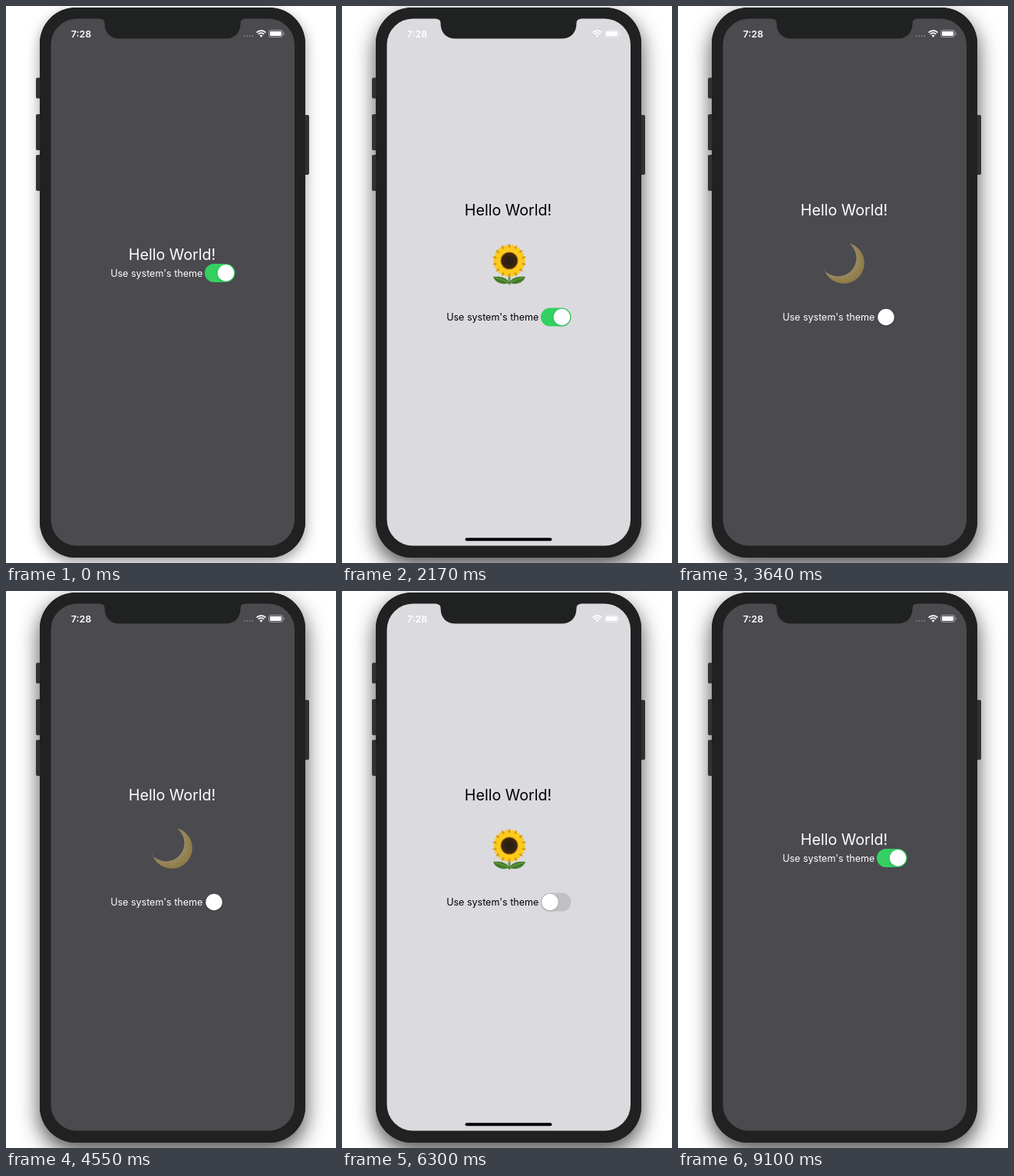
An HTML page with a canvas for the animation above (9310 ms loop, 430x726 px).

```html
<!DOCTYPE html>
<html lang="en">
<head>
<meta charset="utf-8">
<title>Theme switch</title>
<style>
  html, body { margin: 0; width: 100%; height: 100%; overflow: hidden; background: #fff; }
  canvas { display: block; width: 430px; height: 726px; }
</style>
</head>
<body>
<canvas id="stage"></canvas>
<script>
const W = 430, H = 726, LOOP = 9310;
const OFF_AT = 2170, DARK_AT = 3640, LIGHT_AT = 4620, ON_AT = 6370;
const SLIDE = 260, PRESSED = 0.45;
const FONT = 'Inter, Roboto, sans-serif';
const GREEN = [52, 209, 98];
const THEMES = {
  dark: { bg: [75, 74, 79], track: [75, 74, 79], text: '#fff', dots: '#858489' },
  light: { bg: [219, 218, 223], track: [193, 192, 196], text: '#000', dots: '#e3e2e6' }
};

const canvas = document.getElementById('stage');
const ctx = canvas.getContext('2d');
const scale = window.devicePixelRatio || 1;
canvas.width = W * scale;
canvas.height = H * scale;

const clamp = v => Math.max(0, Math.min(1, v));
const progress = (t, start, length) => clamp((t - start) / length);
const ease = p => p * p * (3 - 2 * p);
const rgb = c => `rgb(${c.map(Math.round).join()})`;
const mix = (a, b, p) => a.map((v, i) => v + (b[i] - v) * p);

function box(x, y, w, h, r, fill) {
  ctx.beginPath();
  ctx.roundRect(x, y, w, h, r);
  ctx.fillStyle = fill;
  ctx.fill();
}

function disc(c, x, y, r, fill) {
  c.beginPath();
  c.arc(x, y, r, 0, Math.PI * 2);
  c.fillStyle = fill;
  c.fill();
}

function label(text, x, y, size, fill, weight = 400) {
  ctx.font = `${weight} ${size}px ${FONT}`;
  ctx.textAlign = 'center';
  ctx.fillStyle = fill;
  ctx.fillText(text, x, y);
}

// Emoji are drawn once, so that they can fade as a whole.
const SPRITE = { x: 186, y: 304, size: 64 };
function sprite(draw) {
  const layer = document.createElement('canvas');
  layer.width = layer.height = SPRITE.size * scale;
  const c = layer.getContext('2d');
  c.scale(scale, scale);
  c.translate(-SPRITE.x, -SPRITE.y);
  draw(c);
  return layer;
}

function petals(c, count, turn, inner, outer, half, fill) {
  c.fillStyle = fill;
  for (let i = 0; i < count; i++) {
    c.save();
    c.translate(218, 332);
    c.rotate(turn + i * Math.PI * 2 / count);
    c.beginPath();
    c.moveTo(inner, 0);
    c.quadraticCurveTo(inner + 5, -half * 1.8, outer, 0);
    c.quadraticCurveTo(inner + 5, half * 1.8, inner, 0);
    c.fill();
    c.restore();
  }
}

function leaf(c, side) {
  c.save();
  c.translate(218, 361);
  c.scale(side, 1);
  c.beginPath();
  c.moveTo(0, 0);
  c.bezierCurveTo(3, -7, 11, -9, 21, -8);
  c.bezierCurveTo(18, 0, 9, 3, 0, 0);
  c.fillStyle = '#437c2b';
  c.fill();
  c.beginPath();
  c.moveTo(2, -1);
  c.quadraticCurveTo(9, -5, 18, -7);
  c.strokeStyle = '#78a650';
  c.lineWidth = 1;
  c.stroke();
  c.restore();
}

const flower = sprite(c => {
  c.fillStyle = '#5f9440';
  c.fillRect(216.6, 350, 2.8, 13);
  leaf(c, -1);
  leaf(c, 1);
  petals(c, 14, 0.22, 5, 22.5, 5, '#dfa010');
  petals(c, 14, 0, 5, 22, 5, '#fccb1c');
  disc(c, 218, 332, 11.5, '#b06c10');
  disc(c, 218, 332, 10.5, '#3b2512');
  disc(c, 218, 332, 6, '#2b2011');
});

const moon = sprite(c => {
  const shade = c.createRadialGradient(208.4, 328.4, 23, 214, 333, 31);
  shade.addColorStop(0, '#f6da8c');
  shade.addColorStop(0.45, '#efc650');
  shade.addColorStop(1, '#d9ac3c');
  const angle = (cx, cy, x, y) => Math.atan2(y - cy, x - cx);
  c.beginPath();
  c.arc(216, 335, 26.8, angle(216, 335, 224, 309.5), angle(216, 335, 190, 343.5));
  c.arc(208.4, 328.4, 24, angle(208.4, 328.4, 190, 343.5), angle(208.4, 328.4, 224, 309.5), true);
  c.closePath();
  c.fillStyle = shade;
  c.fill();
});

function drawShell(focused) {
  ctx.save();
  ctx.shadowColor = focused ? 'rgba(0,0,0,.7)' : 'rgba(0,0,0,.4)';
  ctx.shadowBlur = (focused ? 28 : 17) * scale;
  ctx.shadowOffsetY = (focused ? 11 : 6) * scale;
  box(44, 2, 346, 717, 47, '#202121');
  ctx.restore();
  for (const [x, y, h] of [[39, 93.5, 27], [39, 141, 47], [39, 194, 47], [387, 142, 78]]) {
    box(x, y, 8, h, 2, '#303131');
  }
  box(44, 2, 346, 717, 47, '#202121');
}

function drawNotch() {
  ctx.beginPath();
  ctx.moveTo(123, 15);
  ctx.lineTo(123, 17);
  ctx.quadraticCurveTo(128.5, 17, 128.5, 22.5);
  ctx.bezierCurveTo(128.5, 35, 136, 42.5, 148, 42.5);
  ctx.lineTo(286, 42.5);
  ctx.bezierCurveTo(298, 42.5, 305.5, 35, 305.5, 22.5);
  ctx.quadraticCurveTo(305.5, 17, 311, 17);
  ctx.lineTo(311, 15);
  ctx.fillStyle = '#202121';
  ctx.fill();
}

function drawStatus(theme) {
  label('7:28', 98, 40.6, 12.4, '#fff', 600);
  for (let i = 0; i < 4; i++) disc(ctx, 310.3 + i * 3.7, 39, 1, theme.dots);

  ctx.strokeStyle = '#fff';
  ctx.lineWidth = 1.7;
  for (const r of [5.2, 8.2]) {
    ctx.beginPath();
    ctx.arc(332.5, 40.3, r, -Math.PI * 0.76, -Math.PI * 0.24);
    ctx.stroke();
  }
  ctx.beginPath();
  ctx.moveTo(332.5, 40.8);
  ctx.arc(332.5, 40.3, 2.7, -Math.PI * 0.78, -Math.PI * 0.22);
  ctx.closePath();
  ctx.fillStyle = '#fff';
  ctx.fill();

  ctx.beginPath();
  ctx.roundRect(342.5, 31.5, 18, 9, 2.6);
  ctx.strokeStyle = 'rgba(255,255,255,.45)';
  ctx.lineWidth = 1;
  ctx.stroke();
  box(344, 33, 15, 6, 1.3, '#fff');
  box(361.6, 34.5, 1.1, 3, 0.5, 'rgba(255,255,255,.5)');
}

function drawToggle(y, on, theme) {
  box(259, y - 12, 39.5, 24, 12, rgb(mix(theme.track, GREEN, on)));
  ctx.save();
  ctx.shadowColor = 'rgba(0,0,0,.18)';
  ctx.shadowBlur = 3 * scale;
  ctx.shadowOffsetY = scale;
  disc(ctx, 271 + 15.5 * on, y, 10.7, '#fff');
  ctx.restore();
}

// The pressed emoji dims, then recovers after the theme has changed.
function emojiAlpha(t) {
  for (const flip of [DARK_AT, LIGHT_AT]) {
    if (t < flip - 210 || t > flip + 100) continue;
    const dim = t < flip ? progress(t, flip - 230, 120) : 1 - progress(t, flip, 100);
    return 1 - (1 - PRESSED) * dim;
  }
  return 1;
}

function draw(t) {
  const system = t < OFF_AT || t >= ON_AT;
  const dark = system || (t >= DARK_AT && t < LIGHT_AT);
  const theme = dark ? THEMES.dark : THEMES.light;
  const on = 1 - ease(progress(t, OFF_AT, SLIDE)) + ease(progress(t, ON_AT, SLIDE));
  const shift = system ? 0 : 57.5;

  ctx.setTransform(scale, 0, 0, scale, 0, 0);
  ctx.fillStyle = '#fff';
  ctx.fillRect(0, 0, W, H);
  drawShell(t >= OFF_AT);
  box(58.5, 16.5, 317.5, 687, 34, rgb(theme.bg));
  drawNotch();
  drawStatus(theme);

  label('Hello World!', 216.5, 330.7 - shift, 19.7, theme.text);
  label("Use system's theme", 196.2, 352.8 + shift, 12.5, theme.text);
  drawToggle(348 + shift, on, theme);

  if (!system) {
    ctx.globalAlpha = emojiAlpha(t);
    ctx.drawImage(dark ? moon : flower, SPRITE.x, SPRITE.y, SPRITE.size, SPRITE.size);
    ctx.globalAlpha = 1;
  }
  if (!dark) box(160.5, 693.2, 113, 4, 2, '#000');
}

const start = performance.now();
function tick() {
  draw((performance.now() - start) % LOOP);
  requestAnimationFrame(tick);
}
tick();
</script>
</body>
</html>
```
